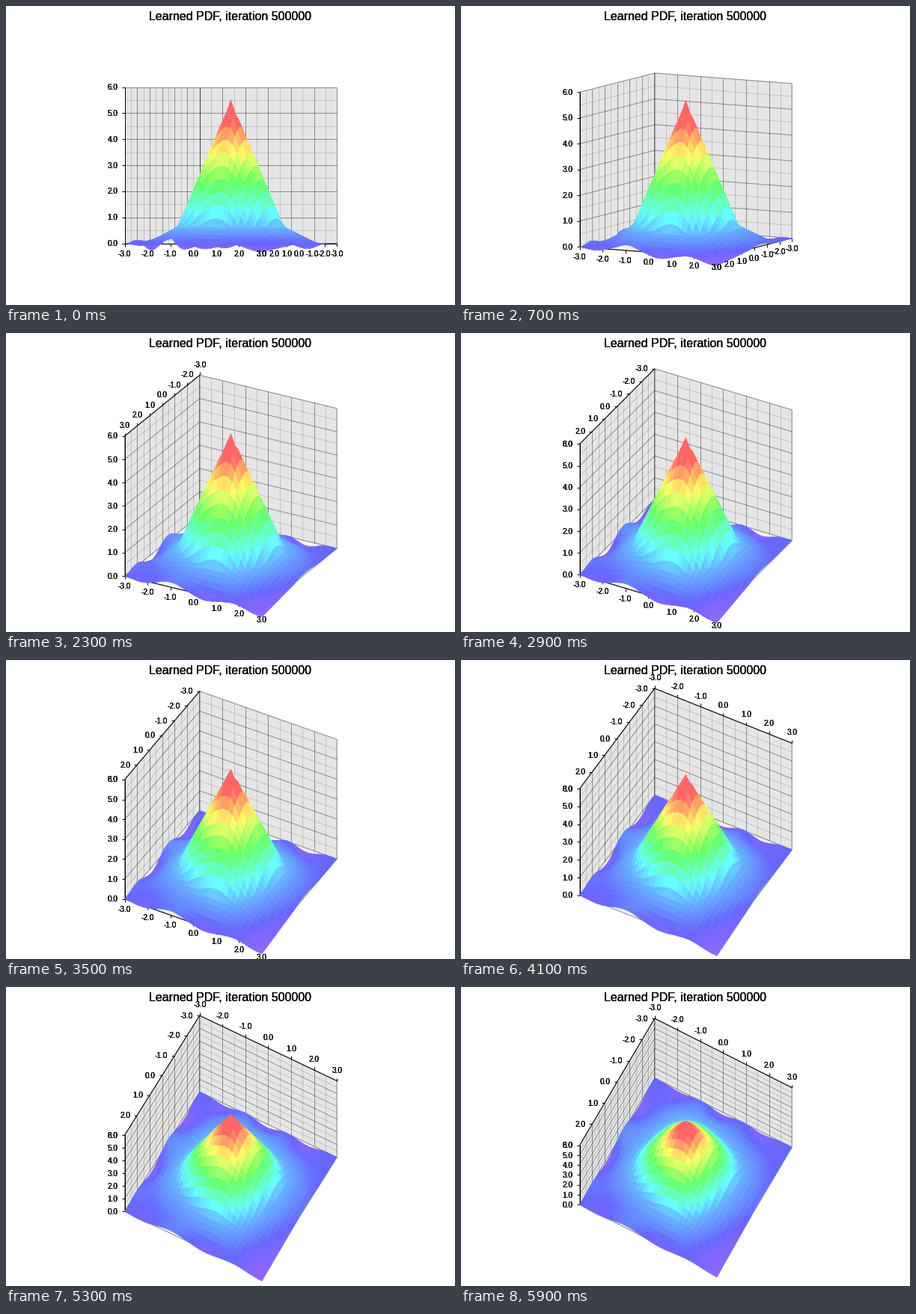
These frames come from a looping animation (600 by 400 pixels, 6000 ms). A matplotlib script:

```python
import numpy as np
import matplotlib.pyplot as plt
from matplotlib.animation import FuncAnimation
from matplotlib.collections import LineCollection, PolyCollection
from matplotlib.colors import hsv_to_rgb

W, H = 600, 400
PX = 0.72                      # points per pixel at 100 dpi
FRAMES, INTERVAL = 60, 100
AZIMUTH, TILT_STEP = 0.5, 0.02
UNIT = 209 / 6                 # pixels per data unit
CX, CY = 300.4, 213.0
CELLS = 30
Y_FLIP, SIDE_FLIP, X_FLIP = 0.43, 0.577, 0.785

COS_A, SIN_A = np.cos(AZIMUTH), np.sin(AZIMUTH)


def flat(x, y):
    """Horizontal screen offset and depth towards the viewer, in data units."""
    return x * COS_A - y * SIN_A, x * SIN_A + y * COS_A


def project(x, y, z, tilt):
    h, d = flat(x, y)
    return (CX + UNIT * h,
            CY + UNIT * (d * np.sin(tilt) - (z - 3) * np.cos(tilt)))


def edge_wave(inset, along, peak, period):
    """Ripple that follows one side of the plain and fades inwards."""
    fade = np.exp(-(inset / 0.5) ** 2) * (1 - (along / 3) ** 2)
    return fade, np.cos(2 * np.pi * (along - peak) / period)


def height(x, y):
    h, d = flat(x, y)
    r = np.hypot(h, d) * (1.05 - 0.05 * np.cos(4 * np.arctan2(d, h)))
    z = np.maximum(np.maximum(5.5 - 2.4 * r, 0.5 * (3.3 - r)), 0)

    fade, wave = edge_wave(x + 3, y, -0.5, 2.7)
    z = z + fade * (0.3 * wave - 0.05)
    fade, wave = edge_wave(y + 3, x, 0.85, 1.9)
    z = z + fade * (0.18 * wave - 0.14)
    fade, wave = edge_wave(3 - y, x, -1.05, 3)
    z = z + fade * 0.24 * wave
    return z - 0.33 * np.clip((x + y - 3) / 3, 0, 1)


def corners(a):
    quads = [a[:-1, :-1], a[1:, :-1], a[1:, 1:], a[:-1, 1:]]
    return np.stack(quads, axis=-1).reshape(-1, 4)


nodes = np.linspace(-3, 3, CELLS + 1)
gx, gy = np.meshgrid(nodes, nodes, indexing="ij")
qx, qy, qz = (corners(a) for a in (gx, gy, height(gx, gy)))
order = np.argsort(flat(qx.mean(1), qy.mean(1))[1])   # far to near
qx, qy, qz = qx[order], qy[order], qz[order]

hue = np.clip(2 / 3 * (1 - qz.mean(1) / 4.6), 0, 0.75)
colors = hsv_to_rgb(np.column_stack(
    [hue, np.full_like(hue, 0.6), np.ones_like(hue)]))


# Box corners seen from the viewer, at the bottom and the top
def ring(z):
    return (-3, 3, z), (-3, -3, z), (3, -3, z), (3, 3, z)


left, back, right, front = ring(0)
left_top, back_top, right_top, _ = ring(6)

WALLS = [[left, back, back_top, left_top], [back, right, right_top, back_top]]
FLOOR = [[left, back, right, front]]
EDGES = [wall + wall[:1] for wall in WALLS] + [[left, front, right]]


def grid(values, levels):
    lines = [[(-3, v, 0), (-3, v, 6)] for v in values]
    lines += [[(v, -3, 0), (v, -3, 6)] for v in values]
    return lines + [ring(z)[:3] for z in levels]


MAJOR = grid(np.arange(-2, 3), np.arange(1, 6))
MINOR = grid(np.arange(-2.5, 3), np.arange(0.5, 6))


def place(paths, tilt):
    return [np.column_stack(project(*np.array(p, float).T, tilt))
            for p in paths]


fig = plt.figure(figsize=(W / 100, H / 100), dpi=100, facecolor="white")
ax = fig.add_axes([0, 0, 1, 1])
ax.set_xlim(0, W)
ax.set_ylim(H, 0)
ax.axis("off")


def add_fill(color, zorder, edge="none"):
    return ax.add_collection(PolyCollection(
        [], facecolors=color, edgecolors=edge, linewidths=0.4,
        zorder=zorder), autolim=False)


def add_lines(alpha, zorder):
    return ax.add_collection(LineCollection(
        [], colors=[(0, 0, 0, alpha)], linewidths=PX, zorder=zorder),
        autolim=False)


floor = add_fill("#f2f2f2", 1)
walls = add_fill("#e5e5e5", 1.1)
minor = add_lines(0.15, 2)
major = add_lines(0.38, 2.1)
edges = add_lines(0.45, 2.2)
axes_lines = add_lines(1, 2.3)
surface = add_fill(colors, 3, edge=colors)


class Label:
    """Text drawn in layers, for the heavier antialiasing of the plot's type."""

    def __init__(self, text, size, layers=3):
        self.size = size
        self.items = [ax.text(0, 0, text, fontsize=size * PX, color="black",
                              family="Liberation Sans", va="baseline",
                              ha="center", zorder=5) for _ in range(layers)]

    def move(self, x, y, ha="center"):
        for item in self.items:
            item.set_position((x, y + 0.36 * self.size))
            item.set_ha(ha)


Label("Learned PDF, iteration 500000", 16).move(299.7, 13.7)
TICKS = range(-3, 4)
LEVELS = range(7)
x_labels, y_labels, z_labels = (
    [Label(f"{v:.1f}", 10) for v in values] for values in (TICKS, TICKS, LEVELS))

# Direction away from the plot, and distance of the label
SIDES = {"below": (0, 1, 13.5), "above": (0, -1, 14.5), "left": (-1, 0, 9)}


def draw_axis(labels, points, side, tilt):
    """Place labels and return the axis line with its ticks."""
    ux, uy, gap = SIDES[side]
    line = place([points], tilt)[0]
    for label, (x, y) in zip(labels, line):
        label.move(x + gap * ux, y + gap * uy,
                   "right" if side == "left" else "center")
    return [line] + [np.array([(x, y), (x + 4 * ux, y + 4 * uy)])
                     for x, y in line]


def update(i):
    tilt = TILT_STEP * i
    for item, paths in ((floor, FLOOR), (walls, WALLS)):
        item.set_verts(place(paths, tilt))
    for item, paths in ((minor, MINOR), (major, MAJOR), (edges, EDGES)):
        item.set_segments(place(paths, tilt))
    surface.set_verts(np.stack(project(qx, qy, qz, tilt), axis=-1))

    if tilt < X_FLIP:
        lines = draw_axis(x_labels, [(v, 3, 0) for v in TICKS], "below", tilt)
    else:
        lines = draw_axis(x_labels, [(v, -3, 6) for v in TICKS], "above", tilt)
    if tilt < Y_FLIP:
        lines += draw_axis(y_labels, [(3, v, 0) for v in TICKS], "below", tilt)
    else:
        side = "above" if tilt < SIDE_FLIP else "left"
        lines += draw_axis(y_labels, [(-3, v, 6) for v in TICKS], side, tilt)
    lines += draw_axis(z_labels, [(-3, 3, v) for v in LEVELS], "left", tilt)
    axes_lines.set_segments(lines)
    return []


anim = FuncAnimation(fig, update, frames=FRAMES, interval=INTERVAL,
                     init_func=lambda: update(0), repeat=True, blit=False)
plt.show()
```
